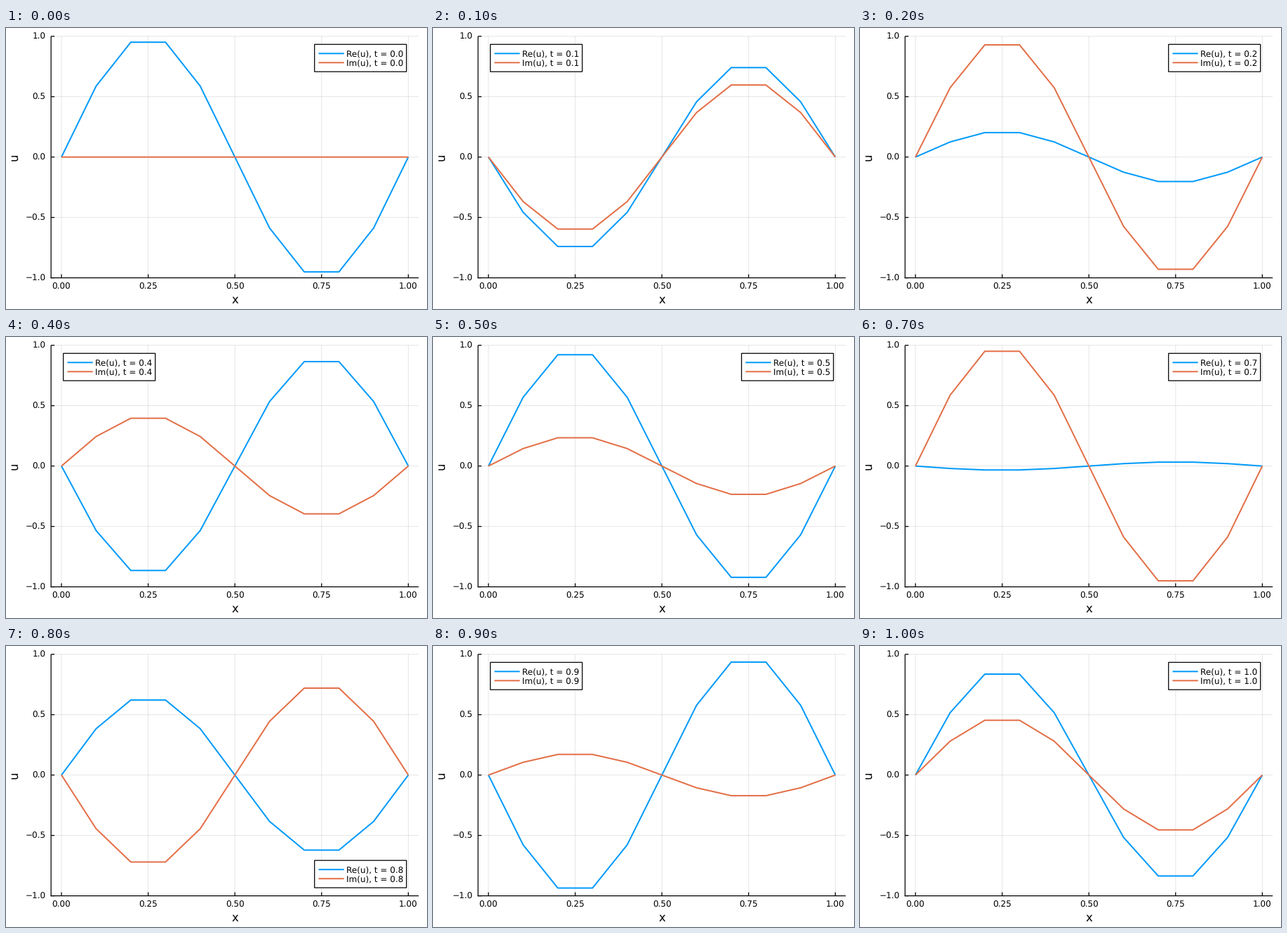
A matplotlib script that plays this animation: 600x400 px, repeating every 1100 ms.

```python
import numpy as np
import matplotlib.pyplot as plt
from matplotlib.animation import FuncAnimation
from matplotlib.patches import Rectangle

W, H, DPI = 600, 400, 100
FRAMES, STEP_MS = 11, 100
LEFT, RIGHT, TOP, BOTTOM = 64.2, 588.2, 11.8, 355.6
BLUE, ORANGE = "#009AFA", "#E36F47"
TEXT_PX, LABEL_PX = 12, 16.5
BOX_W, BOX_H, ROW = 131, 38.9, 13

plt.rcParams.update({"font.family": "DejaVu Sans", "text.hinting": "none",
                     "toolbar": "None"})


def pt(px):
    return px * 72 / DPI


def sx(x):
    return LEFT + (x + 0.03) / 1.06 * (RIGHT - LEFT)


def sy(y):
    return TOP + (1 - y) / 2 * (BOTTOM - TOP)


fig = plt.figure(figsize=(W / DPI, H / DPI), dpi=DPI, facecolor="white")
ax = fig.add_axes([0, 0, 1, 1])
ax.set(xlim=(0, W), ylim=(H, 0))
ax.axis("off")


def line(xs, ys, color="black", width=1.25, **kw):
    return ax.plot(xs, ys, color=color, lw=pt(width), snap=False,
                   solid_capstyle="butt", solid_joinstyle="round", **kw)[0]


def text(x, y, s, size=TEXT_PX, **kw):
    return ax.text(x, y, s, fontsize=pt(size), va="baseline", **kw)


# Grid, axes and labels
for v in np.linspace(0, 1, 5):
    x = sx(v)
    line([x, x], [TOP, BOTTOM], width=1, alpha=0.1, zorder=1)
    line([x, x], [BOTTOM, BOTTOM - 5], zorder=2)
    text(x, 371.4, f"{v:.2f}", ha="center")
for v in np.linspace(-1, 1, 5):
    y = sy(v)
    line([LEFT, RIGHT], [y, y], width=1, alpha=0.1, zorder=1)
    line([LEFT, LEFT + 5], [y, y], zorder=2)
    text(56.7, y + 4.4, f"{v:.1f}".replace("-", "\u2212"), ha="right")
line([LEFT, LEFT], [TOP, BOTTOM + 0.6], zorder=2)
line([LEFT - 0.6, RIGHT], [BOTTOM, BOTTOM], zorder=2)
text((LEFT + RIGHT) / 2, 391.5, "x", LABEL_PX, ha="center")
text(16, sy(0), "u", LABEL_PX, ha="center", rotation=90,
     rotation_mode="anchor")

# Standing wave on a coarse grid, turning at its discrete eigenvalue
grid = np.linspace(0, 1, 11)
mode = np.sin(2 * np.pi * grid)
omega = 2 * (1 - np.cos(0.2 * np.pi)) / 0.1**2

curves = [line(sx(grid), sy(mode), c, 2, zorder=3) for c in (BLUE, ORANGE)]

box = ax.add_patch(Rectangle((0, 0), BOX_W, BOX_H, fc="white", ec="black",
                             lw=pt(1.25), snap=False, zorder=4))
keys = [line([], [], c, 2, zorder=5) for c in (BLUE, ORANGE)]
names = [text(0, 0, "", zorder=5) for _ in keys]


def legend_corner(parts):
    """First corner free of points, preferring the top right."""
    left, right = grid < 0.235, grid > 0.765
    x_right, y_top = RIGHT - 17.5 - BOX_W, TOP + 11.5
    if not any((p[right] > 0.5).any() for p in parts):
        return x_right, y_top
    if not any((p[left] > 0.5).any() for p in parts):
        return LEFT + 17.5, y_top
    return x_right, BOTTOM - 11.5 - BOX_H


def update(i):
    t = i / 10
    u = mode * np.exp(1j * omega * t)
    parts = u.real, u.imag
    x, y = legend_corner(parts)
    box.set_xy((x, y))
    for k, (part, name) in enumerate(zip(parts, ("Re", "Im"))):
        curves[k].set_ydata(sy(part))
        row = y + ROW * (k + 1)
        keys[k].set_data([x + 5.8, x + 42], [row, row])
        names[k].set_position((x + 45.3, row + 4.4))
        names[k].set_text(f"{name}(u), t = {t:.1f}")
    return [*curves, box, *keys, *names]


anim = FuncAnimation(fig, update, frames=FRAMES, interval=STEP_MS,
                     repeat=True, repeat_delay=0)
plt.show()
```
